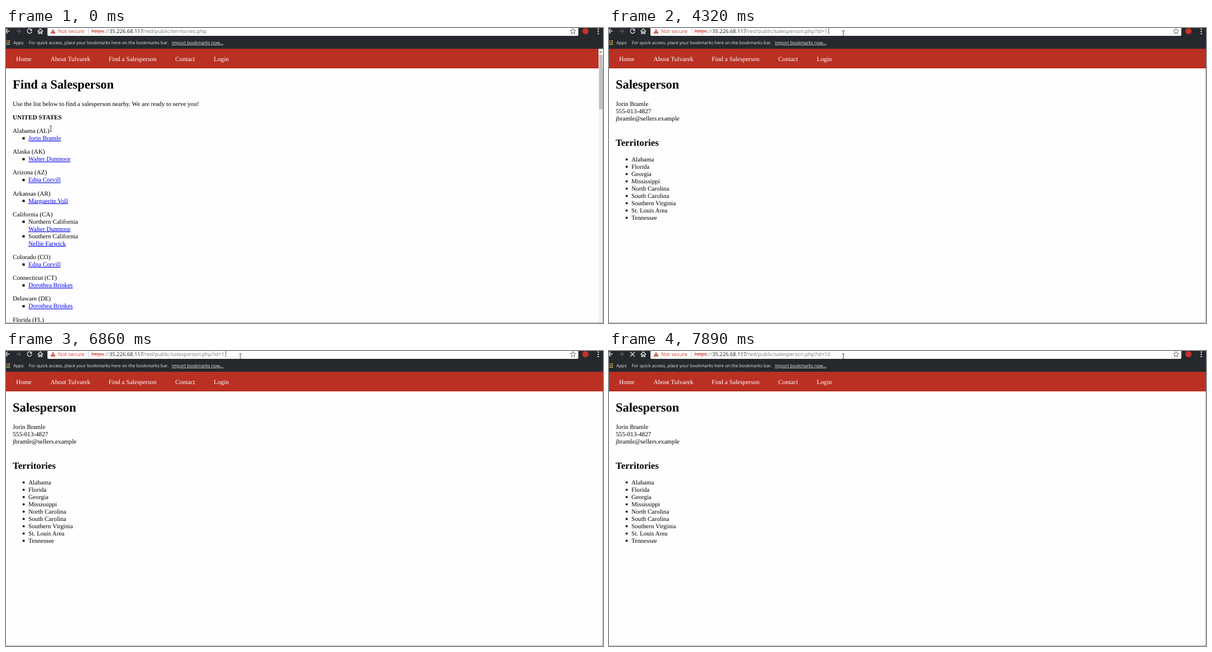
Write an HTML page that moves like this. It is 1066 by 526 pixels and loops after 8000 ms.

```html
<!DOCTYPE html>
<html lang="en">
<head>
<meta charset="utf-8">
<title>Find a Salesperson</title>
<style>
html, body { margin: 0; width: 100%; height: 100%; overflow: hidden; background: #fefefe; }
svg { display: block; width: 1066px; height: 526px; }
text { text-rendering: geometricPrecision; white-space: pre; }
.page { font: 11.2px "Liberation Serif", "Times New Roman", serif; fill: #000; }
.page .h1 { font-size: 22.4px; font-weight: bold; }
.page .h2 { font-size: 16.8px; font-weight: bold; }
.page .b { font-weight: bold; }
.page .link { fill: #00e; text-decoration: underline; }
.nav { font: 11.3px "Liberation Serif", "Times New Roman", serif; fill: #fff; }
.ui { font: 9.3px "Open Sans", "Noto Sans", sans-serif; fill: #222; }
.marks { font-size: 7.9px; fill: #e6e6e6; }
.dim { fill: #7a7a7a; }
.bad { fill: #cf4436; }
.strike { text-decoration: line-through; }
.white { fill: #fff; }
.line { fill: none; stroke: #e2e2e2; stroke-width: 1.3; }

/* Every state holds until the next keyframe. */
.t { animation: 8s step-end infinite; }
#territories { animation-name: territories; }
#salesperson { animation-name: salesperson; }
#reload { animation-name: reload; }
#stop { animation-name: stop; }
#secure { animation-name: secure; }
#path0 { animation-name: path0; }
#path1 { animation-name: path1; }
#path10 { animation-name: path10; }
#typed { animation-name: typed; }
#selection { animation-name: selection; }
#caret { animation-name: caret; }
#caret10 { animation-name: caret10; }
#dropdown { animation-name: dropdown; }
#beam { animation-name: beam; }
#hand { animation-name: hand; }
#arrow { animation-name: arrow; }

@keyframes territories { 0% { opacity: 1 } 28.75% { opacity: 0 } }
@keyframes salesperson { 0% { opacity: 0 } 28.75% { opacity: 1 } }
@keyframes reload { 0%, 28.75% { opacity: 1 } 23.375%, 95% { opacity: 0 } }
@keyframes stop { 0%, 28.75% { opacity: 0 } 23.375%, 95% { opacity: 1 } }
@keyframes secure { 0%, 98.625% { opacity: 1 } 87.5% { opacity: 0 } }
@keyframes path0 { 0% { opacity: 1 } 25% { opacity: 0 } }
@keyframes path1 { 0%, 87.5% { opacity: 0 } 25% { opacity: 1 } }
@keyframes path10 { 0% { opacity: 0 } 98.625% { opacity: 1 } }
@keyframes typed { 0%, 98.625% { opacity: 0 } 87.5% { opacity: 1 } }
@keyframes selection { 0%, 58.625% { opacity: 0 } 55.5% { opacity: 1 } }
@keyframes caret {
  0%, 55.5%, 62.125%, 67.125%, 71.875%, 77.125%, 82.5%, 87.5% { opacity: 0 }
  54%, 58.625%, 65.5%, 70.25%, 75.375%, 80.625%, 85.75% { opacity: 1 }
}
@keyframes caret10 { 0%, 89.375%, 95% { opacity: 0 } 87.5%, 93.125% { opacity: 1 } }
@keyframes dropdown { 0%, 95% { opacity: 0 } 87.5% { opacity: 1 } }
@keyframes beam {
  0% { opacity: 1; transform: translate(80px, 179.5px) }
  1.75% { transform: translate(77px, 187.5px) }
  4.625% { opacity: 0 }
  36.875% { opacity: 1; transform: translate(412.5px, 11px) }
  38.375% { transform: translate(415px, 10.5px) }
  40% { transform: translate(418.5px, 10px) }
}
@keyframes hand { 0%, 26.875% { opacity: 0 } 4.625% { opacity: 1 } }
@keyframes arrow {
  0% { opacity: 0; transform: translate(128px, 174px) }
  26.875% { opacity: 1 }
  28.75% { transform: translate(442px, 127px) }
  30.625% { transform: translate(521px, 85px) }
  35.125% { transform: translate(422px, 19px) }
  36.875% { opacity: 0 }
}
</style>
</head>
<body>
<svg viewBox="0 0 1066 526">
  <rect width="1066" height="526" fill="#fefefe"/>

  <rect y="37" width="1066" height="35" fill="#ba3023"/>
  <g class="nav">
    <text x="18" y="59">Home</text>
    <text x="79.5" y="59">About Tulvarek</text>
    <text x="183.3" y="59">Find a Salesperson</text>
    <text x="302.3" y="59">Contact</text>
    <text x="371" y="59">Login</text>
  </g>

  <g id="territories" class="page t"></g>
  <g id="salesperson" class="page t"></g>
  <path d="M0 525.5H1066M1065.5 72V526" stroke="#b0b0b0" fill="none"/>

  <g class="ui">
    <rect width="1066" height="37" fill="#25292d"/>
    <path class="line" d="M-1 5.5H6.5M3 1.5L-1 5.5L3 9.5"/>
    <path class="line" style="stroke:#555a5e" d="M18 5.5H26M22 1.5L26 5.5L22 9.5"/>
    <g id="reload" class="t">
      <path class="line" d="M45.2 3A4 4 0 1 0 46 6.2"/>
      <path d="M46.4 1V5H42.4Z" fill="#e2e2e2"/>
    </g>
    <path id="stop" class="line t" d="M38 1.8L46 9.8M46 1.8L38 9.8"/>
    <path class="line" d="M56.5 6L61.2 1.5L66 6M58.2 5V10H60V7H62.5V10H64.3V5"/>
    <path d="M74 0H1022V12Q1022 14 1020 14H76Q74 14 74 12Z" fill="#fff"/>
    <path d="M1012.5 .8l1.4 3.1 3.4.4-2.5 2.3.7 3.4-3-1.7-3 1.7.7-3.4-2.5-2.3 3.4-.4z" fill="none" stroke="#555" stroke-width=".9"/>
    <circle cx="1034.7" cy="5.7" r="5.5" fill="#c9302c"/>
    <g fill="#e2e2e2">
      <circle cx="1057.5" cy="2" r="1.2"/>
      <circle cx="1057.5" cy="6" r="1.2"/>
      <circle cx="1057.5" cy="10" r="1.2"/>
    </g>

    <g id="apps"></g>
    <g class="marks">
      <text x="13" y="28.8">Apps</text>
      <text x="40.8" y="28.8">For quick access, place your bookmarks here on the bookmarks bar.</text>
      <text x="296" y="28.8" text-decoration="underline">Import bookmarks now...</text>
    </g>

    <g id="secure" class="t">
      <path d="M84 1.5L88.6 9.7H79.4Z" fill="#cf4436"/>
      <path d="M84 4.4V7M84 7.7V8.7" stroke="#fff"/>
      <text class="bad" x="93" y="9">Not secure</text>
      <path d="M147.5 0V11" stroke="#ccc"/>
      <text y="9"><tspan class="bad strike" x="152.5">https</tspan><tspan class="dim">://</tspan><tspan x="184.5">35.226.68.117</tspan></text>
    </g>
    <g class="dim">
      <text id="path0" class="t" x="244.6" y="9">/red/public/territories.php</text>
      <text id="path1" class="t" x="244.6" y="9">/red/public/salesperson.php?id=1</text>
      <text id="path10" class="t" x="244.6" y="9">/red/public/salesperson.php?id=10</text>
    </g>
    <g id="selection" class="t">
      <rect x="152" width="239.5" height="11" fill="#3390ff"/>
      <text class="white" y="9"><tspan x="152.5">https://</tspan><tspan x="184.5">35.226.68.117</tspan><tspan x="244.6">/red/public/salesperson.php?id=1</tspan></text>
    </g>
    <path id="caret" class="t" d="M392.5 0V11" stroke="#444" stroke-width=".8"/>

    <g id="typed" class="t">
      <path d="M81.5 1.5H85.2L87 3.4V9.7H81.5Z" fill="none" stroke="#666" stroke-width=".9"/>
      <text class="dim" y="9"><tspan x="93">https://</tspan><tspan x="125" fill="#222">35.226.68.117</tspan><tspan x="185.2">/red/public/salesperson.php?id=10</tspan></text>
    </g>
    <path id="caret10" class="t" d="M337.5 0V11" stroke="#444" stroke-width=".8"/>

    <g id="dropdown" class="t">
      <rect y="17" width="1066" height="43" fill="#fff"/>
      <rect x="74" y="21" width="948" height="17.5" fill="#3898fc"/>
      <path d="M81.5 25.5H85.2L87 27.4V33.7H81.5Z" fill="none" stroke="#fff" stroke-width=".9"/>
      <text class="white" x="93" y="33" font-size="9.5" font-weight="bold">https://35.226.68.117/red/public/salesperson.php?id=10</text>
      <text x="359.5" y="33" fill="#e4f0ff">-<tspan x="366.3">Salesperson: Probe VonSampler (NOT PUBLIC UNTIL SEPT. 1)</tspan></text>
      <circle cx="83" cy="46.2" r="2.8" fill="none" stroke="#666"/>
      <path d="M85 48.2L88 51.2" stroke="#666" stroke-width="1.3"/>
      <text x="93" y="50.7">https://35.226.68.117/red/public/salesperson.php?id=10</text>
      <text class="dim" x="340" y="50.7">-<tspan x="346.6">Ovindu Search</tspan></text>
    </g>
  </g>

  <g id="beam" class="t">
    <path d="M-2.2 -5H-.7L0 -4.4L.7 -5H2.2M0 -4.4V4.4M-2.2 5H-.7L0 4.4L.7 5H2.2" fill="none" stroke="#222" stroke-width=".9"/>
  </g>
  <g id="hand" class="t">
    <path d="M67 206V199.3Q67 198 68 198T69 199.3V202.5L72.5 203.3Q73.6 203.7 73.5 205L72.6 208.5V211H67.8V209.5L65 206Q64.6 204.8 65.6 204.8Z" fill="#fff" stroke="#222" stroke-width=".9"/>
  </g>
  <g id="arrow" class="t">
    <path d="M.5 .6V9.2L2.5 7.5L3.8 10.5L5.2 9.9L3.9 7H6.6Z" fill="#fff" stroke="#222" stroke-width=".9"/>
  </g>
</svg>
<script>
const $ = id => document.getElementById(id);
const text = (x, y, s, cls = "") => `<text class="${cls}" x="${x}" y="${y}">${s}</text>`;
const square = y => `<rect x="29.4" y="${y - 5.3}" width="4" height="4"/>`;
const disc = y => `<circle cx="31.5" cy="${y - 3.4}" r="1.9"/>`;
const LINE = 13, GAP = 24.2;

const walter = "Walter Dunmoor", edna = "Edna Corvill", dorothea = "Dorothea Brinkes";
const states = [
  ["Alabama (AL)", ["Jorin Bramle"]],
  ["Alaska (AK)", [walter]],
  ["Arizona (AZ)", [edna]],
  ["Arkansas (AR)", ["Marguerite Voll"]],
  ["California (CA)", [walter, "Nellie Farwick"], ["Northern California", "Southern California"]],
  ["Colorado (CO)", [edna]],
  ["Connecticut (CT)", [dorothea]],
  ["Delaware (DE)", [dorothea]],
  ["Florida (FL)", []]
];

let out = text(12, 108, "Find a Salesperson", "h1")
  + text(12, 138.8, "Use the list below to find a salesperson nearby. We are ready to serve you!")
  + text(12, 163, "UNITED STATES", "b");
let y = 187;
for (const [state, people, areas] of states) {
  out += text(12, y, state);
  people.forEach((name, i) => {
    out += square(y += LINE);
    if (areas) {
      out += text(40, y, areas[i]);
      y += LINE;
    }
    out += text(40, y, name, "link");
  });
  y += GAP;
}
out += `<rect x="1058" y="37" width="8" height="488" fill="#f1f1f1"/>
  <rect x="1059" y="48" width="6.5" height="97" fill="#c1c1c1"/>
  <path d="M1060 44L1062.2 41.4L1064.4 44Z" fill="#777"/>`;
$("territories").innerHTML = out;

const areas = ["Alabama", "Florida", "Georgia", "Mississippi", "North Carolina",
  "South Carolina", "Southern Virginia", "St. Louis Area", "Tennessee"];
$("salesperson").innerHTML = text(12, 108, "Salesperson", "h1")
  + ["Jorin Bramle", "555-013-4827", "jbramle@sellers.example"]
    .map((s, i) => text(12, 138.8 + i * LINE, s)).join("")
  + text(12, 209.6, "Territories", "h2")
  + areas.map((s, i) => disc(237.8 + i * LINE) + text(40, 237.8 + i * LINE, s)).join("");

const tints = ["#e0564a", "#e0564a", "#e8b33c", "#4fa36a", "#4a86e0", "#e8b33c", "#4fa36a", "#e8b33c", "#e8b33c"];
$("apps").innerHTML = tints.map((c, i) =>
  `<rect x="${i % 3 * 2.7 - .6}" y="${22 + (i / 3 | 0) * 3}" width="2" height="2" fill="${c}"/>`).join("");
</script>
</body>
</html>
```
